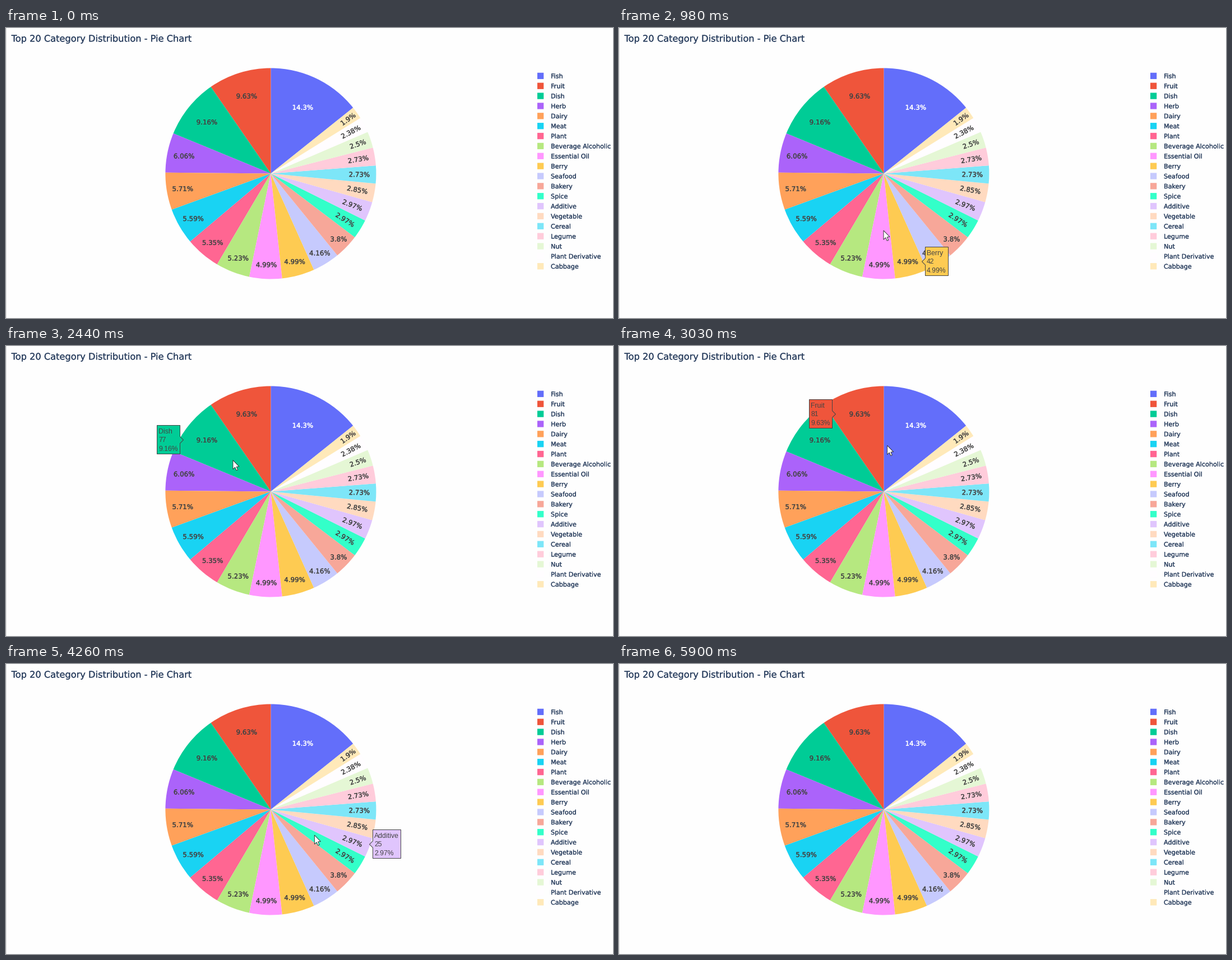
Animation of 1083 by 517 pixels, one loop 6.55 s. Source, as a matplotlib script:

```python
import numpy as np
import matplotlib.pyplot as plt
from matplotlib.animation import FuncAnimation
from matplotlib.patches import Polygon, Rectangle, Wedge
from matplotlib.patheffects import withStroke

W, H, DPI = 1083, 517, 64
PX = 72 / DPI  # points per pixel
LOOP, STEP = 6550, 25
CX, CY, R = 472.4, 259.5, 188
INK, NAVY = "#444444", "#2a3f5f"
LAG = 50  # the hover box trails the pointer, ms

ITEMS = [
    ("Fish", 120, "#636efa"), ("Fruit", 81, "#ef553b"),
    ("Dish", 77, "#00cc96"), ("Herb", 51, "#ab63fa"),
    ("Dairy", 48, "#ffa15a"), ("Meat", 47, "#19d3f3"),
    ("Plant", 45, "#ff6692"), ("Beverage Alcoholic", 44, "#b6e880"),
    ("Essential Oil", 42, "#ff97ff"), ("Berry", 42, "#fecb52"),
    ("Seafood", 35, "#c6cafd"), ("Bakery", 32, "#f7a799"),
    ("Spice", 25, "#33ffc9"), ("Additive", 25, "#e0c5fd"),
    ("Vegetable", 24, "#ffdac0"), ("Cereal", 23, "#7de6f8"),
    ("Legume", 23, "#ffccdb"), ("Nut", 21, "#e5f7d5"),
    ("Plant Derivative", 20, "#fffdff"), ("Cabbage", 16, "#ffe9b9"),
]
COUNTS = np.array([n for _, n, _ in ITEMS])
TOTAL = COUNTS.sum()
# Clockwise degrees from the top; the first slice runs past 360.
ENDS = 360 * (1 + (COUNTS[0] - (np.cumsum(COUNTS) - COUNTS)) / TOTAL)
STARTS = ENDS - 360 * COUNTS / TOTAL
MIDS = (STARTS + ENDS) / 2
HALF = np.pi * COUNTS / TOTAL
INSET = np.sin(HALF) / (1 + np.sin(HALF))

# Pointer sweep around the pie: time, clockwise angle, radius
SWEEP = np.array([
    (640, 100, 112.7), (980, 179.4, 101.5), (1290, 211, 108),
    (1950, 268, 104), (2440, 310.1, 87.6), (2625, 326, 85),
    (3000, 360, 82), (3290, 399, 88), (3560, 417.5, 85.5),
    (3670, 421.6, 85.2), (3945, 449, 85), (4260, 480.3, 90.3),
    (4625, 514, 90), (5010, 575.8, 99.2), (5130, 585.2, 98.6),
])
ARROW = np.array([(0, 0), (0, 16.2), (3.7, 12.7), (6.2, 18.3),
                  (8.7, 17.2), (6.3, 11.8), (11, 11.4)])


def polar(angle, radius):
    a = np.radians(angle)
    return np.array([CX + radius * np.sin(a), CY - radius * np.cos(a)])


def percent(i):
    return f"{100 * COUNTS[i] / TOTAL:.3g}%"


def hermite(t, times, vals):
    """Smooth curve through the points, at rest at both ends."""
    slopes = np.gradient(vals, times)
    slopes[0] = slopes[-1] = 0
    t = np.clip(t, times[0], times[-1])
    k = min(np.searchsorted(times, t, side="right") - 1, len(times) - 2)
    h = times[k + 1] - times[k]
    u = (t - times[k]) / h
    return ((1 + 2 * u) * (1 - u) ** 2 * vals[k]
            + u * (1 - u) ** 2 * h * slopes[k]
            + u * u * (3 - 2 * u) * vals[k + 1]
            + u * u * (u - 1) * h * slopes[k + 1])


def sweep(t):
    return [hermite(t, SWEEP[:, 0], SWEEP[:, c]) for c in (1, 2)]


def glide(t, t0, t1, p, q):
    u = np.clip((t - t0) / (t1 - t0), 0, 1)
    return np.array(p) + (np.array(q) - p) * u * u * (3 - 2 * u)


def pointer(t):
    if t < 160 or t >= 5900:
        return None
    if t < 640:
        return glide(t, 160, 345, (868, 480), polar(*SWEEP[0, 1:]))
    if t < 5400:
        return polar(*sweep(t))
    if t < 5880:
        return glide(t, 5400, 5570, polar(*SWEEP[-1, 1:]), (876, 513))
    return np.array([890, 513])


def hovered(t):
    if t < 345 or t >= 5440:
        return None
    angle = sweep(t - LAG)[0] % 360
    if angle < STARTS[-1]:
        angle += 360
    return int(np.argmax((STARTS <= angle) & (angle < ENDS)))


fig = plt.figure(figsize=(W / DPI, H / DPI), dpi=DPI, facecolor="#fefefe")
ax = fig.add_axes([0, 0, 1, 1])
ax.set_xlim(0, W)
ax.set_ylim(H, 0)
ax.axis("off")


def write(x, y, s, px, color, font="DejaVu Sans", weight=0, **kw):
    """Text on its baseline; weight thickens the letters by that many pixels."""
    text = ax.text(x, y, s, fontsize=px * PX, color=color,
                   family=font, va="baseline", **kw)
    if weight:
        text.set_path_effects([withStroke(linewidth=weight * PX,
                                          foreground=color)])
    return text


def slice_label(i):
    s = percent(i)
    turn, radius = 0, R * (1 - INSET[i])
    if COUNTS[i] <= 25:  # thin slices carry their label along the radius
        aspect = 2.7 if len(s) == 5 else 2.17
        q = aspect + 0.5 / np.tan(HALF[i])
        b = 1 / (np.sqrt(q * q + 0.5) + q)
        turn, radius = 90 - MIDS[i], R * (np.cos(b) - aspect * b)
    x, y = polar(MIDS[i], radius)
    a = np.radians(turn)
    write(x + 4.3 * np.sin(a), y + 4.3 * np.cos(a), s, 11.8,
          "white" if i == 0 else INK, weight=0.3, ha="center",
          rotation=turn, rotation_mode="anchor")


ax.add_patch(Rectangle((0, 0), 1, H, fc="#dedede", lw=0))
write(9.6, 24.3, "Top 20 Category Distribution - Pie Chart", 16.2, NAVY,
      weight=0.15)
for i, (name, _, color) in enumerate(ITEMS):
    ax.add_patch(Wedge((CX, CY), R, STARTS[i] - 90, ENDS[i] - 90,
                       fc=color, lw=0))
    slice_label(i)
    row = 85.4 + 17.86 * i
    ax.add_patch(Rectangle((948, row - 5.65), 11.3, 11.3, fc=color, lw=0,
                           snap=False))
    write(972, row + 4.2, name, 11.2, NAVY, weight=0.2)

bubble = ax.add_patch(Polygon([(0, 0), (1, 1), (1, 0)], ec=INK,
                              lw=PX, zorder=5))
lines = [write(0, 0, "", 12.22, INK, "Liberation Sans", zorder=6)
         for _ in range(3)]
arrow = ax.add_patch(Polygon(ARROW, fc="white", ec="#2b2b2b",
                             lw=0.9 * PX, zorder=8))


def show_bubble(i):
    for art in (bubble, *lines):
        art.set_visible(i is not None)
    if i is None:
        return
    name, count, color = ITEMS[i]
    for line, s in zip(lines, (name, str(count), percent(i))):
        line.set_text(s)
    width = round(max(ln.get_window_extent().width for ln in lines) + 6.5)
    x, y = polar(MIDS[i], R * (1 - INSET[i]))
    side = 1 if x > CX else -1
    x = np.floor(x + side * R * INSET[i]) + 0.5
    y = np.floor(y) + 0.5
    near, far = x + side * 6, x + side * (6 + width)
    bubble.set_xy([(x, y), (near, y - 6), (near, y - 26), (far, y - 26),
                   (far, y + 25), (near, y + 25), (near, y + 6)])
    bubble.set_facecolor(color)
    for k, line in enumerate(lines):
        line.set_position((min(near, far) + 2.7, y - 12 + 15.9 * k))


def draw(frame):
    t = frame * STEP + 10
    show_bubble(hovered(t))
    tip = pointer(t)
    arrow.set_visible(tip is not None)
    if tip is not None:
        arrow.set_xy(ARROW + tip)
    return [bubble, *lines, arrow]


anim = FuncAnimation(fig, draw, frames=LOOP // STEP, interval=STEP,
                     init_func=lambda: draw(0), repeat=True, repeat_delay=0)
plt.show()
```
